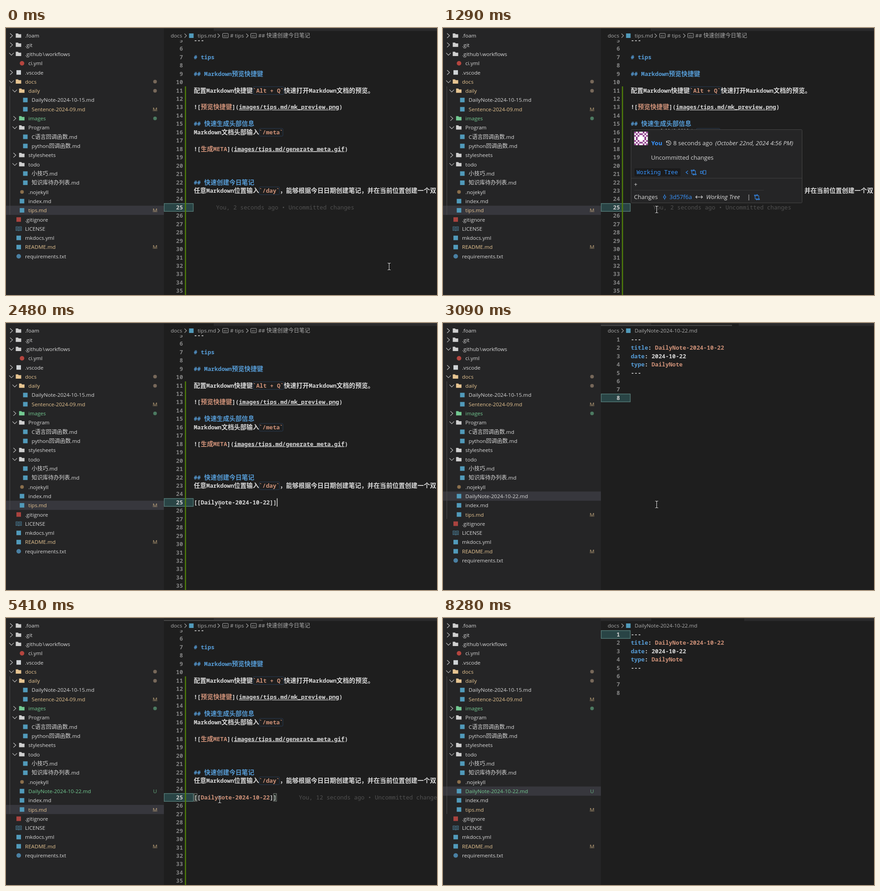
Animation, 950 px wide and 590 px high, one loop 8350 ms. Source, as an HTML page:

```html
<!DOCTYPE html>
<html lang="zh-CN">
<head>
<meta charset="utf-8">
<title>Daily note</title>
<style>
  html, body { margin: 0; width: 100%; height: 100%; overflow: hidden; background: #1e1e1e; }
  svg { display: block; width: 950px; height: 590px; }
  text { white-space: pre; }
  .ui { font: 11.6px "Open Sans", "Noto Sans CJK SC", sans-serif; }
  .ui .cjk { font-size: 12.05px; }
  .code { font: bold 12.7px "Noto Sans Mono", "Noto Sans CJK SC", monospace; }
  .code .cjk { font-size: 13.8px; }
  .code.plain { font-weight: normal; }
  .cjk { font-family: "Noto Sans CJK SC", "Noto Sans CJK", sans-serif; }
  .link { text-decoration: underline; text-underline-offset: 3px; }
  .hover { font: 13.1px "Open Sans", sans-serif; }
  .hover.it { font-style: italic; }
  .hover.strong { font-weight: bold; }
  .line { stroke-width: 1.1; }
</style>
</head>
<body>
<svg viewBox="0 0 950 590">
  <defs><clipPath id="editor"><rect x="348" y="27" width="602" height="563"/></clipPath></defs>
  <g id="scene"></g>
  <rect id="caret" width="1.6" height="18.4" fill="#d0d0ce"/>
  <g id="ibeam">
    <path d="M-3.5 -7.5h2.5l1 1 1-1h2.5M-3.5 7.5h2.5l1-1 1 1h2.5M0 -6.5v13" fill="none" stroke="#000" stroke-width="3"/>
    <path d="M-3.5 -7.5h2.5l1 1 1-1h2.5M-3.5 7.5h2.5l1-1 1 1h2.5M0 -6.5v13" fill="none" stroke="#eee" stroke-width="1.2"/>
  </g>
  <path id="arrow" d="M0 0V15.500l3.600-3.500 2.600 6 2.500-1.100-2.600-5.900h4.900z" fill="#111" stroke="#ccc" stroke-width=".9"/>
</svg>
<script>
const LOOP = 8350;
const WHITE = '#dadada', BLUE = '#569cd6', ORANGE = '#ce9178', LINK = '#3794ff';
const MODIFIED = '#e6c491', ADDED = '#73c991', PLAIN = '#d8d8d8';
const CHAR = 7.62, CODE_X = 414;
const NOTE = 'DailyNote-2024-10-22';
const $ = id => document.getElementById(id);

// Value of the last [time, value] pair reached at t.
const at = (t, steps) => steps.reduce((v, [time, next]) => t >= time ? next : v, steps[0][1]);

const withCjk = s => s.replace(/[\u3000-\u9fff\uff00-\uffef]+/g, m => `<tspan class="cjk">${m}</tspan>`);
const text = (x, y, s, cls, fill, extra = '') =>
  `<text x="${x}" y="${y}" class="${cls}" fill="${fill}" ${extra}>${withCjk(s)}</text>`;
const rect = (x, y, w, h, fill, extra = '') =>
  `<rect x="${x}" y="${y}" width="${w}" height="${h}" fill="${fill}" ${extra}/>`;
const path = (x, y, d, stroke, fill = 'none') =>
  `<path transform="translate(${x} ${y})" d="${d}" class="line" stroke="${stroke}" fill="${fill}"/>`;
const square = (cx, cy, fill, size = 10) => rect(cx - size / 2, cy - size / 2, size, size, fill);
const dot = (cx, cy, fill, r = 5) => `<circle cx="${cx}" cy="${cy}" r="${r}" fill="${fill}"/>`;

const CHEVRON = { '>': 'M-3 -5l5.500 5-5.500 5', v: 'M-5 -2.500l5 5 5-5' };

const icons = {
  md: (x, y) => square(x, y, '#519aba'),
  yml: (x, y) => dot(x, y, '#b5453f'),
  editor: (x, y) => square(x, y, '#cfd3d6'),
  tube: (x, y) => dot(x, y, '#8a6f4c', 4),
  git: (x, y) => square(x, y, '#a9433f'),
  docs: (x, y) => square(x, y, '#519aba'),
  py: (x, y) => dot(x, y, '#4a80a3'),
  book: (x, y) => path(x, y, 'M0 -3.500C-2 -4.700-4 -4.700-6 -4.300V4C-4 3.600-2 3.600 0 4.500C2 3.600 4 3.600 6 4V-4.300C4 -4.700 2 -4.700 0 -3.500V4.500M-4.500 -2h3M-4.500 0h3M-4.500 2h3M1.500 -2h3M1.500 0h3M1.500 2h3', '#4b7f98')
};

const tree = [
  [0, '>', '.foam'], [0, '>', '.git'], [0, 'v', '.github\u200a\\\u200aworkflows'], [1, 'yml', 'ci.yml'],
  [0, '>', '.vscode', PLAIN, '', 'editor'],
  [0, 'v', 'docs', MODIFIED, 'dot'], [1, 'v', 'daily', MODIFIED, 'dot'],
  [2, 'md', 'DailyNote-2024-10-15.md'], [2, 'md', 'Sentence-2024-09.md', MODIFIED, 'M'],
  [1, '>', 'images', ADDED, 'dot'], [1, 'v', 'Program'],
  [2, 'md', 'C语言回调函数.md'], [2, 'md', 'python回调函数.md'],
  [1, '>', 'stylesheets'], [1, 'v', 'todo'],
  [2, 'md', '小技巧.md'], [2, 'md', '知识库待办列表.md'],
  [1, 'tube', '.nojekyll'], [1, 'md', 'index.md'], [1, 'md', 'tips.md', MODIFIED, 'M'],
  [0, 'git', '.gitignore'], [0, 'book', 'LICENSE'], [0, 'docs', 'mkdocs.yml'],
  [0, 'md', 'README.md', MODIFIED, 'M'], [0, 'py', 'requirements.txt']
];

function treeRow([depth, kind, name, color = PLAIN, badge, icon], i, selected) {
  const y = 17 + i * 20.31, shift = depth * 7.3;
  let out = name === selected ? rect(0, y - 10.2, 348, 20.3, '#37373d') : '';
  if (CHEVRON[kind]) out += path(12 + shift, y, CHEVRON[kind], '#c5c5c5');
  if (icons[icon || kind]) out += icons[icon || kind](28 + shift, y);
  else out += path(21 + shift, y - 6, 'M.5 1h5l1.500 1.800h5.500v7.700h-12z', 'none', color === PLAIN ? '#cfcfcf' : color);
  out += text(42 + shift, y + 4.3, name, 'ui', color);
  if (badge === 'dot') out += dot(328.5, y, color === ADDED ? '#4c7a61' : '#77685a', 4);
  else if (badge) out += text(328.5, y + 4.3, badge, 'ui', color, 'text-anchor="middle" opacity=".8"');
  return out;
}

function sidebar({ noteInTree, tracked, selected }) {
  const rows = tree.slice();
  if (noteInTree) rows.splice(18, 0, [1, 'md', NOTE + '.md', tracked ? ADDED : PLAIN, tracked ? 'U' : '']);
  return rect(0, 0, 348, 590, '#252526') + rows.map((r, i) => treeRow(r, i, selected)).join('') +
    rect(8, 129, 1, noteInTree ? 304 : 284, '#4c4c4c');
}

const tips = {
  5: [[WHITE, '---']],
  7: [[BLUE, '# tips']],
  9: [[BLUE, '## Markdown预览快捷键']],
  11: [[WHITE, '配置Markdown快捷键'], [ORANGE, '`Alt + Q`'], [WHITE, '快速打开Markdown文档的预览。']],
  13: [[WHITE, '!['], [ORANGE, '预览快捷键'], [WHITE, ']('], [WHITE, 'images/tips.md/mk_preview.png', 1], [WHITE, ')']],
  15: [[BLUE, '## 快速生成头部信息']],
  16: [[WHITE, 'Markdown文档头部输入'], [ORANGE, '`/meta`']],
  18: [[WHITE, '!['], [ORANGE, '生成META'], [WHITE, ']('], [WHITE, 'images/tips.md/generate_meta.gif', 1], [WHITE, ')']],
  22: [[BLUE, '## 快速创建今日笔记']],
  23: [[WHITE, '任意Markdown位置输入'], [ORANGE, '`/day`'], [WHITE, '，能够根据今日日期创建笔记，并在当前位置创建一个双']]
};
const note = {
  1: [[WHITE, '---']],
  2: [[BLUE, 'title'], [WHITE, ': '], [ORANGE, NOTE]],
  3: [[BLUE, 'date'], [WHITE, ': 2024-10-22']],
  4: [[BLUE, 'type'], [WHITE, ': '], [ORANGE, 'DailyNote']],
  5: [[WHITE, '---']]
};
const tipsY = n => 46 + (n - 6) * 18.45;
const noteY = n => 36.5 + (n - 1) * 18.43;

const codeLine = (y, tokens) => `<text x="${CODE_X}" y="${y + 4.3}" class="code">` + tokens.map(([fill, s, link]) =>
  `<tspan fill="${fill}"${link ? ' class="link"' : ''}>${withCjk(s)}</tspan>`).join('') + '</text>';
const codeBox = (x, n, line) =>
  rect(x, tipsY(line) - 8.5, n * CHAR - 1.5, 17, 'none', 'rx="2" stroke="#283d55"');

function lines(content, first, last, yOf, active) {
  let out = rect(348.7, yOf(active) - 8.7, 64, 17.4, '#294445', 'stroke="#557b77" stroke-width="1.4"');
  for (let n = first; n <= last; n++) {
    out += text(390, yOf(n) + 4.3, String(n), 'code', n === active ? '#d0d0d0' : '#858585', 'text-anchor="end"');
    if (content[n]) out += codeLine(yOf(n), content[n]);
  }
  return out;
}

function tipsEditor({ typed, linked, ctrl, blame }) {
  const y = tipsY(25);
  let out = codeBox(545, 9, 11) + codeBox(558.5, 7, 16) + codeBox(558.5, 6, 23) +
    lines(tips, 5, 35, tipsY, 25) + rect(394.3, 129, 2.6, 461, '#4f7d0a');
  if (linked) {
    for (const k of [0, 23]) out += rect(CODE_X + k * CHAR + .5, y - 8.5, CHAR - 1, 17, '#1f2a22', 'stroke="#858585"');
    out += codeLine(y, [[WHITE, '[['], [ctrl ? '#4e94ce' : ORANGE, NOTE, ctrl], [WHITE, ']]']]);
  } else if (typed) out += codeLine(y, [[WHITE, typed]]);
  if (blame) out += text(typed ? 645.5 : 463, y + 4.3, `You, ${blame} seconds ago • Uncommitted changes`, 'code plain', '#505050');
  return out;
}

function breadcrumbs(isTips) {
  const color = '#acacac', label = (x, s) => text(x, 21.3, s, 'ui', color);
  const abc = x => rect(x, 12, 12.5, 9.5, 'none', `rx="1" stroke="${color}"`) +
    text(x + 6.2, 18.6, 'abc', 'ui', color, 'text-anchor="middle" style="font-size:5.500px"');
  const next = x => path(x, 17, 'M-2 -4.500l4.500 4.500-4.500 4.500', color);
  let out = label(363, 'docs') + next(395.5) + icons.md(408.5, 17) + label(422.5, isTips ? 'tips.md' : NOTE + '.md');
  if (isTips) out += next(468.5) + abc(477.5) + label(494, '# tips') + next(531.5) + abc(539.5) + label(556, '## 快速创建今日笔记');
  return out;
}

function tabs({ isTips, tabEnd, scrollbar }) {
  const [start, end] = isTips ? [348, 458] : [459, tabEnd];
  return rect(348, 0, 602, 6.5, '#2b2b2c') + rect(start, 0, end - start, 7, '#1e1e1e') +
    (scrollbar ? rect(348, 4, scrollbar - 348, 2.5, '#454545') : '') + rect(0, 0, 950, 1, '#3a3a3a');
}

// Small mirrored pattern of purple cells on white.
function avatar(x, y) {
  let out = rect(x, y, 30, 30, '#fff');
  for (let i = 0; i < 64; i++) {
    const col = i % 8, row = i >> 3, a = Math.min(col, 7 - col), b = Math.min(row, 7 - row);
    if ((a + b) % 2 === 0 && a + b < 6) out += rect(x + col * 3.75, y + row * 3.75, 3.75, 3.75, '#8d3a8a');
  }
  return out;
}

function hoverCard(opacity) {
  const compare = (x, y) => path(x, y, 'M-4 -3.500v5.500q0 2.500 3 2.500h2M-1 2.500l2 2-2 2M4 3.500v-5.500q0-2.500-3-2.500h-2M1 -6.500l-2 2 2 2M-5.500 -5h3v2h-3zM2.500 3.500h3v2h-3z', LINK);
  const say = (x, y, s, cls = '', fill = PLAIN) => text(x, y, s, 'hover ' + cls, fill);
  return `<g opacity="${opacity}">` +
    rect(414.5, 224.5, 377, 162, '#252526', 'stroke="#454545" rx="2"') + avatar(421.5, 229) +
    say(459, 258.5, 'You', 'strong', LINK) +
    path(497.5, 254, 'M-5 -4.500v3.500h3.500M-5 -1a5 5 0 1 1 .5 3.500M0 -3v3.500l2.500 1.500', PLAIN) +
    say(507.5, 258.5, '8 seconds ago') + say(600, 258.5, '(October 22nd, 2024 4:56 PM)', 'it') +
    say(458.5, 291, 'Uncommitted changes') +
    rect(422, 310, 101.5, 17.5, '#1b1b1c', 'rx="2"') + text(426.5, 323.3, 'Working Tree', 'code plain', LINK) +
    path(537.5, 319, 'M2.500 -3.500l-4.500 3.500 4.500 3.500', LINK) + compare(552.5, 319) +
    path(573.5, 319, 'M-6 -2.500h4v5h-4zM0 -4h6v8h-6z', LINK) +
    rect(415, 331.5, 376, 1, '#404040') + say(421, 350, '+') + rect(421, 358, 286, 1, '#363637') +
    say(421, 377.5, 'Changes') + path(488.5, 373.5, 'M0 -6v3.500M0 2.500v3.500M-2.500 0a2.500 2.500 0 1 0 5 0a2.500 2.500 0 1 0 -5 0', LINK) +
    say(499, 377.5, '3d57f6a', '', LINK) +
    path(564.5, 373.5, 'M-7.500 0h15M-4.500 -3l-3 3 3 3M4.500 -3l3 3-3 3', PLAIN) +
    say(580, 377.5, 'Working Tree', 'it') + say(670.5, 377.5, '|') + compare(692, 374) + '</g>';
}

const suggestions = items => rect(414.5, 406.5, 430, items.length * 18.45 + 2, '#252526', 'stroke="#454545"') +
  rect(415, 407.5, 429, 18.45, '#04395e') +
  items.map((s, i) => text(434, 421 + i * 18.45, s, 'code plain', WHITE)).join('');

function stateAt(t) {
  return {
    isTips: at(t, [[0, true], [2620, false], [5000, true], [6640, false]]),
    noteInTree: t >= 2690,
    tracked: t >= 4130,
    selected: at(t, [[0, 'tips.md'], [2690, NOTE + '.md'], [5000, 'tips.md'], [6710, NOTE + '.md']]),
    tabEnd: t < 4130 ? 652 : 664,
    scrollbar: at(t, [[0, 0], [2620, 637], [3580, 0], [5000, 566], [5830, 0]]),
    typed: at(t, [[0, ''], [1490, '/'], [1820, '/d'], [1890, '/da'], [1950, '/day'], [2410, `[[${NOTE}]]`]]),
    linked: t >= 5000,
    ctrl: t >= 6300,
    blame: at(t, [[0, 2], [1490, 0], [5410, 12]]),
    card: at(t, [[0, 0], [1150, .4], [1220, .8], [1290, 1], [1490, 0]]),
    list: at(t, [[0, ''], [1560, '/day /meta'], [1820, '/day'], [2410, '']]),
    active: t < 6000 ? 8 : 1
  };
}

const scene = s => rect(348, 0, 602, 590, '#1e1e1e') +
  `<g clip-path="url(#editor)">${s.isTips ? tipsEditor(s) : lines(note, 1, 8, noteY, s.active)}</g>` +
  breadcrumbs(s.isTips) + sidebar(s) + tabs(s) +
  (s.card ? hoverCard(s.card) : '') + (s.list ? suggestions(s.list.split(' ')) : '');

function showCaret(t, s) {
  const on = at(t, [[0, 0], [680, 1], [1220, 0], [1490, 1], [3090, 0], [3580, 1], [4130, 0], [4670, 1],
    [5280, 0], [5970, 1], [6440, 0], [6640, 1], [7250, 0], [7730, 1], [8280, 0]]);
  const y = s.isTips ? tipsY(25) : noteY(s.active);
  $('caret').setAttribute('x', CODE_X + (s.isTips ? s.typed.length * CHAR : 0));
  $('caret').setAttribute('y', y - 9.2);
  $('caret').style.display = on ? '' : 'none';
}

// Pointer glide sampled in discrete steps with an ease in and out.
function glide(t, start, end, steps, from, to) {
  const raw = (t - start) / (end - start) * (steps - 1);
  const p = raw < 0 ? 0 : Math.min(1, (Math.floor(raw + .001) + 1) / steps);
  const e = p * p * (3 - 2 * p);
  return from.map((v, i) => v + (to[i] - v) * e);
}

function showPointer(t) {
  const rest = [471, 401], link = [531.5, 400.5];
  const pos = t < 5900 ? glide(t, 70, 750, 11, [844.5, 527], rest)
    : t < 7000 ? glide(t, 5970, 6300, 5, rest, link)
    : glide(t, 7250, 7670, 7, link, [874, 543]);
  const arrow = t >= 6440;
  $('ibeam').style.display = arrow ? 'none' : '';
  $('arrow').style.display = arrow && t < 7730 ? '' : 'none';
  $(arrow ? 'arrow' : 'ibeam').setAttribute('transform', `translate(${pos})`);
}

let shown = '';
const begin = performance.now();
function frame() {
  const t = (performance.now() - begin) % LOOP, s = stateAt(t), key = JSON.stringify(s);
  if (key !== shown) {
    $('scene').innerHTML = scene(s);
    shown = key;
  }
  showCaret(t, s);
  showPointer(t);
  requestAnimationFrame(frame);
}
frame();
</script>
</body>
</html>
```
